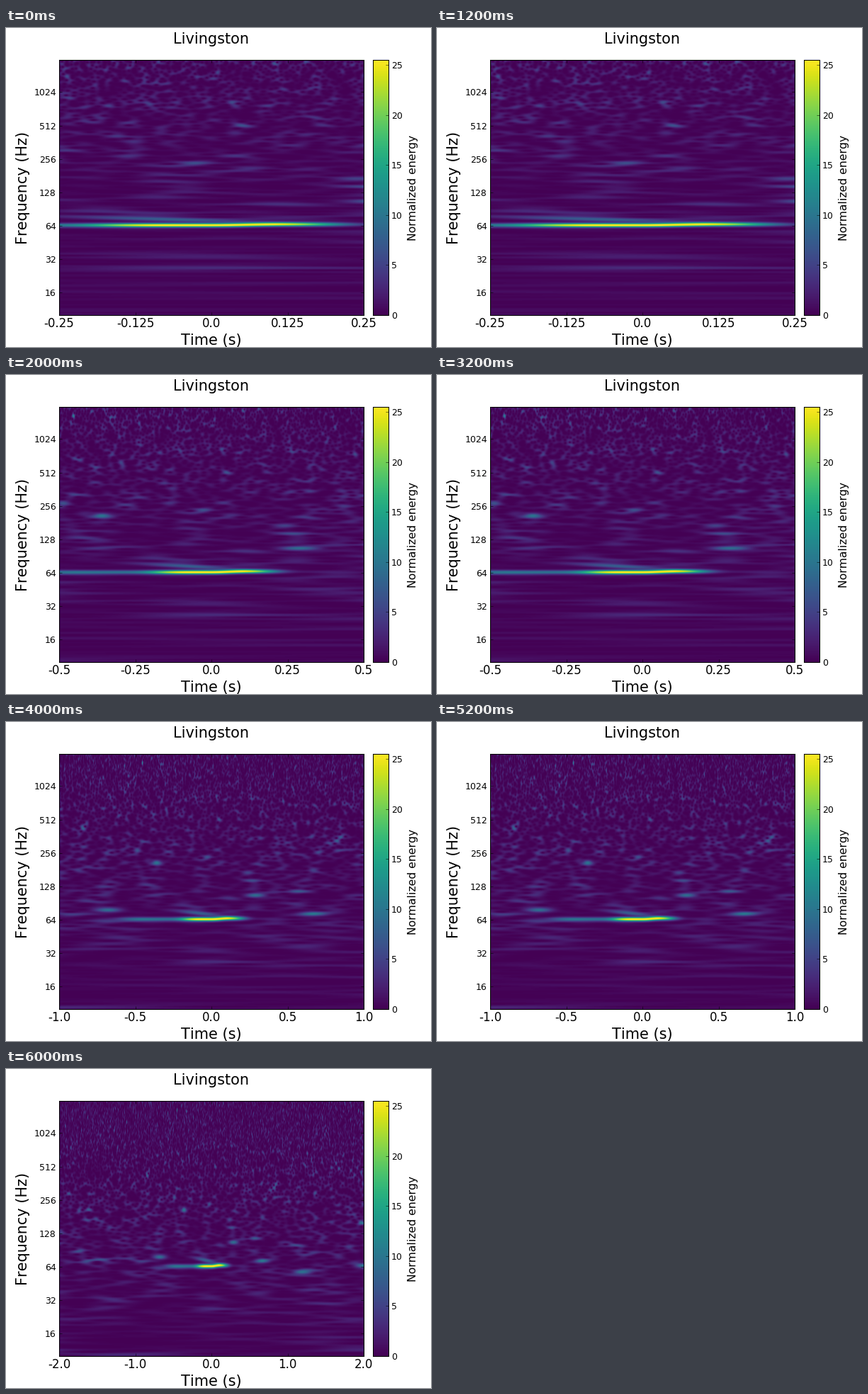
Write a matplotlib script that moves like this. It is 600 by 450 pixels and loops after 8 s.

```python
import numpy as np
import matplotlib.pyplot as plt
from matplotlib.animation import FuncAnimation

W, H, DPI = 600, 450, 75
F_MIN, F_MAX, E_MAX = 10, 2000, 25.5
HALF_SPANS = [0.25 * 2 ** k for k in range(4)]
COLS, ROWS = 430, 360
Q = 33

# Isolated bursts: time (s), frequency (Hz)
BURSTS = [(-0.36, 210), (0.29, 106), (-0.68, 78), (0.67, 72), (1.2, 57), (2.0, 65)]

plt.rcParams.update({"font.family": "DejaVu Sans", "axes.linewidth": 1.0,
                     "text.kerning_factor": 6})


def bell(x, centre, width, power=2):
    return np.exp(-np.abs((x - centre) / width) ** power)


def noise_energy(views, freqs, seed=11):
    """Constant-Q energy of white noise, sampled on each view's time grid."""
    rng = np.random.default_rng(seed)
    n, duration = 32768, 8.0
    spectrum = rng.normal(size=n) + 1j * rng.normal(size=n)
    bins = np.arange(n) / duration
    clock = bins * duration ** 2 / n - duration / 2
    out = [np.empty((len(freqs), len(t))) for t in views]
    for row, f in enumerate(freqs):
        window = np.exp(-0.5 * ((bins - f) / (f / Q)) ** 2)
        wave = np.fft.ifft(spectrum * window) * n
        energy = np.abs(wave) ** 2 / (2 * np.sum(window ** 2))
        level = np.interp(f, [40, 80], [0.6, 0.85])
        for grid, t in zip(out, views):
            grid[row] = level * np.interp(t, clock, energy)
    return out


def signal_energy(t, log_f):
    rows = log_f[:, None]

    # Main line: a bright plateau with a weaker lead-in and a slight upward step.
    step = np.clip(t / 0.12, 0, 1)
    line = np.log2(64.5 + 1.2 * step ** 2 * (3 - 2 * step))
    strength = 26 * bell(t, 0.01, 0.2, 4) + 9.5 * bell(t, -0.38, 0.24, 4)
    total = strength * bell(rows, line, 0.06)

    # Faint arc descending onto the line.
    arc = np.log2(71 - 25 * t)
    total += 6.5 * bell(t, -0.08, 0.16) * bell(rows, arc, 0.06)

    for time, f in BURSTS:
        total += 9 * bell(t, time, 6.4 / f) * bell(rows, np.log2(f), 0.064)
    return total


log_f = np.linspace(np.log2(F_MIN), np.log2(F_MAX), ROWS)
views = [np.linspace(-s, s, COLS) for s in HALF_SPANS]
maps = [noise + signal_energy(t, log_f)
        for noise, t in zip(noise_energy(views, 2 ** log_f), views)]

fig = plt.figure(figsize=(W / DPI, H / DPI), dpi=DPI, facecolor="white")


def label(x, y, text, size, rotation=0):
    fig.text(x / W, 1 - y / H, text, fontsize=size, rotation=rotation,
             ha="center", va="baseline", rotation_mode="anchor")


ax = fig.add_axes([75 / W, 0.1, 430 / W, 0.8])
image = ax.imshow(maps[0], origin="lower", aspect="auto", cmap="viridis",
                  vmin=0, vmax=E_MAX, interpolation="bilinear",
                  extent=[-1, 1, log_f[0], log_f[-1]])
octaves = range(4, 11)
ax.set_xticks(np.linspace(-1, 1, 5))
ax.set_yticks(octaves, [str(2 ** k) for k in octaves])
ax.tick_params(direction="in", length=4, width=0.5, top=True, right=True)
ax.tick_params(axis="x", labelsize=16, pad=3)
ax.tick_params(axis="y", labelsize=12, pad=4)

bar = fig.add_axes([518 / W, 0.1, 22 / W, 0.8])
bar.imshow(np.linspace(0, 1, 256)[:, None], origin="lower", aspect="auto",
           cmap="viridis", extent=[0, 1, 0, E_MAX])
bar.set_xticks([])
bar.yaxis.tick_right()
bar.set_yticks(range(0, 26, 5))
bar.tick_params(direction="in", length=4, width=0.5, labelsize=12, pad=4)

label(290, 22, "Livingston", 20)
label(290, 446.5, "Time (s)", 20)
label(29.5, 225, "Frequency (Hz)", 20, 90)
label(578.5, 225, "Normalized energy", 15, 90)


def update(i):
    image.set_data(maps[i])
    ax.set_xticklabels([str(float(v)) for v in HALF_SPANS[i] * ax.get_xticks()])
    return [image]


anim = FuncAnimation(fig, update, frames=len(HALF_SPANS), interval=2000,
                     repeat=True, blit=False)
plt.show()
```
